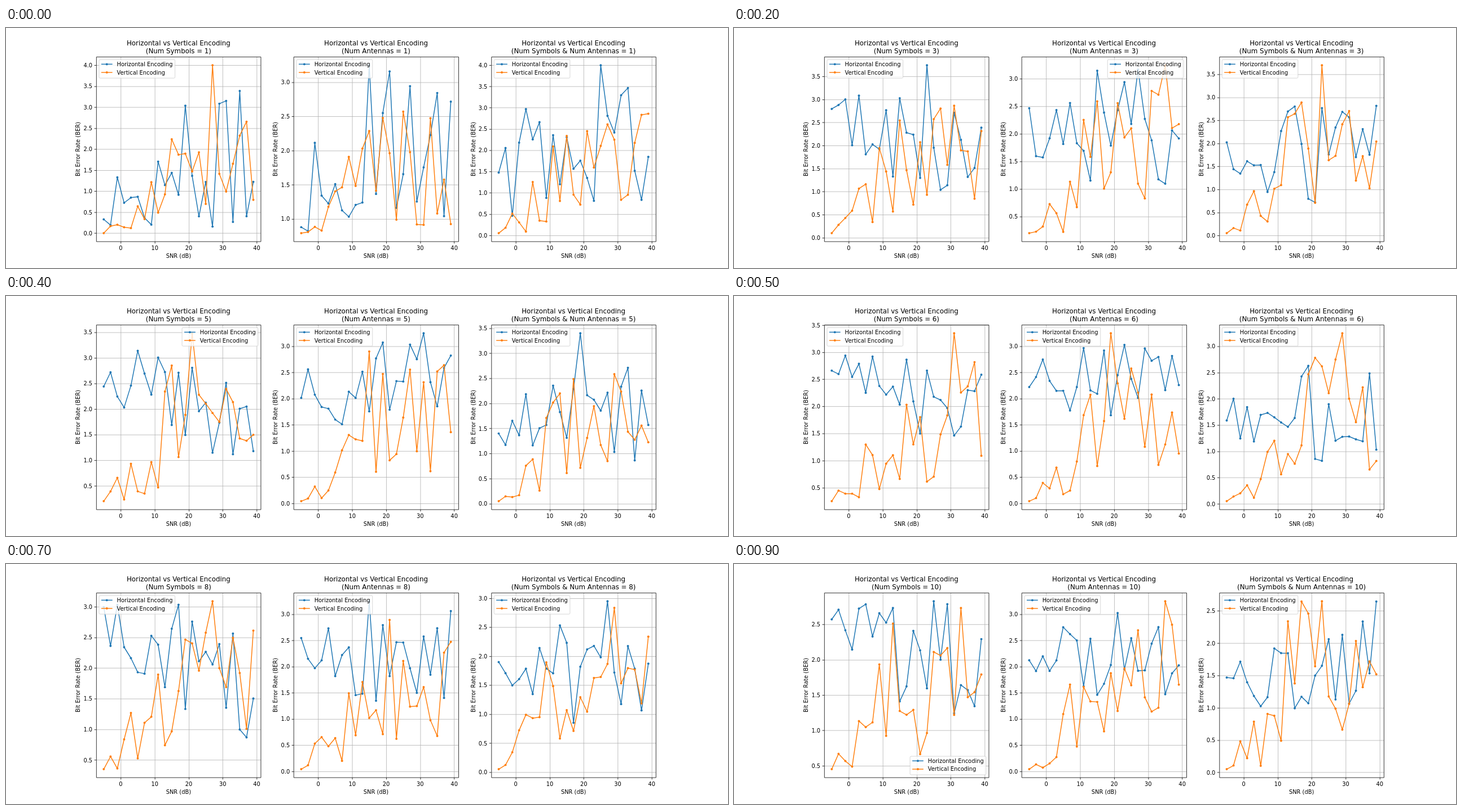
Recreate the animation shown at these times as an HTML page with a canvas. Size 1280 by 427 pixels, loop 1000 ms.

```html
<!DOCTYPE html>
<html lang="en">
<head>
<meta charset="utf-8">
<title>Horizontal vs Vertical Encoding</title>
<style>
  html, body { margin: 0; width: 100%; height: 100%; overflow: hidden; background: #fff; }
  canvas { display: block; }
</style>
</head>
<body>
<canvas id="stage" width="1280" height="427"></canvas>
<script>
const ctx = document.getElementById('stage').getContext('2d');
const PT = 1280 / 18 / 72;
const PIXEL = 1280 / 1800;
const EM = 10 * PT;
const TOP = 51.24, BOTTOM = 380.03, WIDTH = 291.76, STRIDE = 350.12, LEFT = 160;
const COUNT = 23, STEPS = 10, STEP_MS = 100;
const BLUE = '#1f77b4', ORANGE = '#ff7f0e';

// Each panel gives its value range and the level where the horizontal curve
// starts and ends; n counts from 1. The legend is upper left unless listed.
const panels = [
  {
    label: 'Num Symbols',
    lo: n => .05 * (n - 1), hi: n => 4 - .13 * (n - 1),
    start: n => 2.8 - 2 * Math.exp(1 - n), end: 1.7,
    lower: [2, 7, 10], upperRight: [5]
  },
  {
    label: 'Num Antennas',
    lo: n => .04 + .75 * Math.exp(-(((n - 1) / 1.6) ** 2)), hi: () => 3.25,
    start: n => 2.3 - 1.3 * Math.exp(1 - n), end: 2.2,
    lower: [], upperRight: [3, 7]
  },
  {
    label: 'Num Symbols & Num Antennas',
    lo: () => .05, hi: n => 4 - .15 * (n - 1),
    start: () => 1.6, end: 1.8,
    lower: [2, 7], upperRight: []
  }
];

function makeRandom(seed) {
  let state = seed * 7919 + 17;
  return () => {
    state = (Math.imul(state, 1664525) + 1013904223) >>> 0;
    return state / 2 ** 32;
  };
}

// Reflects a value that leaves the range back into it.
function fold(v, lo, hi) {
  const span = hi - lo;
  const offset = (((v - lo) % (2 * span)) + 2 * span) % (2 * span);
  return lo + (offset > span ? 2 * span - offset : offset);
}

function makeChart(panel, n, seed) {
  const random = makeRandom(seed);
  const lo = panel.lo(n), hi = panel.hi(n), start = panel.start(n);
  const makeSeries = (trend, spread) => Array.from({ length: COUNT }, (_, i) => {
    const ramp = Math.min(1, i / 10);
    return fold(trend(i, ramp) + spread(ramp) * (2 * random() - 1), lo, hi);
  });
  const series = [
    makeSeries(i => start + (panel.end - start) * i / (COUNT - 1),
      ramp => .25 + 1 / n + .55 * ramp),
    makeSeries((i, ramp) => lo + (1.75 - lo) * ramp ** 1.3,
      ramp => .12 + 1.05 * ramp)
  ];
  series[1][0] = lo;
  series[Math.floor(random() * 2)][10 + Math.floor(random() * 12)] = hi;
  return { lo, hi, series };
}

panels.forEach((panel, p) => {
  panel.charts = Array.from({ length: STEPS }, (_, i) => makeChart(panel, i + 1, i * 3 + p + 1));
});

const snap = v => (Math.floor(v / PIXEL + .5) + .5) * PIXEL;

function text(string, x, y, align = 'center', points = 10) {
  ctx.font = `${points * PT}px "DejaVu Sans", sans-serif`;
  ctx.textAlign = align;
  ctx.fillStyle = '#000';
  ctx.fillText(string, x, y);
}

function line(points, color, width) {
  ctx.beginPath();
  points.forEach(([x, y]) => ctx.lineTo(x, y));
  ctx.strokeStyle = color;
  ctx.lineWidth = width * PT;
  ctx.stroke();
}

function dot([x, y], color) {
  ctx.beginPath();
  ctx.arc(x, y, 2 * PT, 0, Math.PI * 2);
  ctx.fillStyle = color;
  ctx.fill();
}

function drawLegend(left, atRight, atBottom) {
  const width = 134.7, height = 33, pad = EM / 2;
  const x = atRight ? left + WIDTH - pad - width : left + pad;
  const y = atBottom ? BOTTOM - pad - height : TOP + pad;
  ctx.beginPath();
  ctx.roundRect(x, y, width, height, .2 * EM);
  ctx.fillStyle = 'rgba(255,255,255,.8)';
  ctx.fill();
  ctx.strokeStyle = 'rgba(204,204,204,.8)';
  ctx.lineWidth = PT;
  ctx.stroke();
  [['Horizontal Encoding', BLUE], ['Vertical Encoding', ORANGE]].forEach(([name, color], i) => {
    const rowY = y + 8.2 + i * 14.7, start = x + .4 * EM;
    line([[start, rowY], [start + 2 * EM, rowY]], color, 1.5);
    dot([start + EM, rowY], color);
    text(name, start + 2.8 * EM, rowY + 3.5, 'left');
  });
}

function drawPanel(panel, p, n) {
  const left = LEFT + p * STRIDE, right = left + WIDTH, center = left + WIDTH / 2;
  const { lo, hi, series } = panel.charts[n - 1];
  const margin = (hi - lo) * .05, tick = 3.5 * PT;
  const toX = snr => left + WIDTH * (snr + 7.2) / 48.4;
  const toY = v => BOTTOM - (BOTTOM - TOP) * (v - lo + margin) / (hi - lo + 2 * margin);

  for (let snr = 0; snr <= 40; snr += 10) {
    const x = snap(toX(snr));
    line([[x, TOP], [x, BOTTOM]], '#b0b0b0', .8);
    line([[x, BOTTOM], [x, BOTTOM + tick]], '#000', .8);
    text(String(snr), toX(snr), 394.8);
  }
  for (let v = Math.ceil((lo - margin) * 2) / 2; v <= hi + margin; v += .5) {
    const y = snap(toY(v));
    line([[left, y], [right, y]], '#b0b0b0', .8);
    line([[left - tick, y], [left, y]], '#000', .8);
    text(Math.abs(v).toFixed(1), left - 2 * tick, toY(v) + 3.8, 'right');
  }

  series.forEach((values, s) => {
    const color = s ? ORANGE : BLUE;
    const points = values.map((v, i) => [toX(2 * i - 5), toY(v)]);
    line(points, color, 1.5);
    points.forEach(point => dot(point, color));
  });

  ctx.strokeStyle = '#000';
  ctx.lineWidth = .8 * PT;
  ctx.strokeRect(snap(left), snap(TOP), snap(right) - snap(left), snap(BOTTOM) - snap(TOP));
  const atBottom = panel.lower.includes(n);
  drawLegend(left, atBottom || panel.upperRight.includes(n), atBottom);

  text('Horizontal vs Vertical Encoding', center, 31.4, 'center', 12);
  text(`(${panel.label} = ${n})`, center, 45.3, 'center', 12);
  text('SNR (dB)', center, 409);
  ctx.save();
  ctx.translate(left - 28.7, (TOP + BOTTOM) / 2);
  ctx.rotate(-Math.PI / 2);
  text('Bit Error Rate (BER)', 0, 0);
  ctx.restore();
}

function draw(ms) {
  const n = Math.floor(ms / STEP_MS) % STEPS + 1;
  ctx.fillStyle = '#fff';
  ctx.fillRect(0, 0, 1280, 427);
  ctx.lineJoin = 'round';
  panels.forEach((panel, p) => drawPanel(panel, p, n));
}

const start = performance.now();
function tick() {
  draw(performance.now() - start);
  requestAnimationFrame(tick);
}
tick();
</script>
</body>
</html>
```
